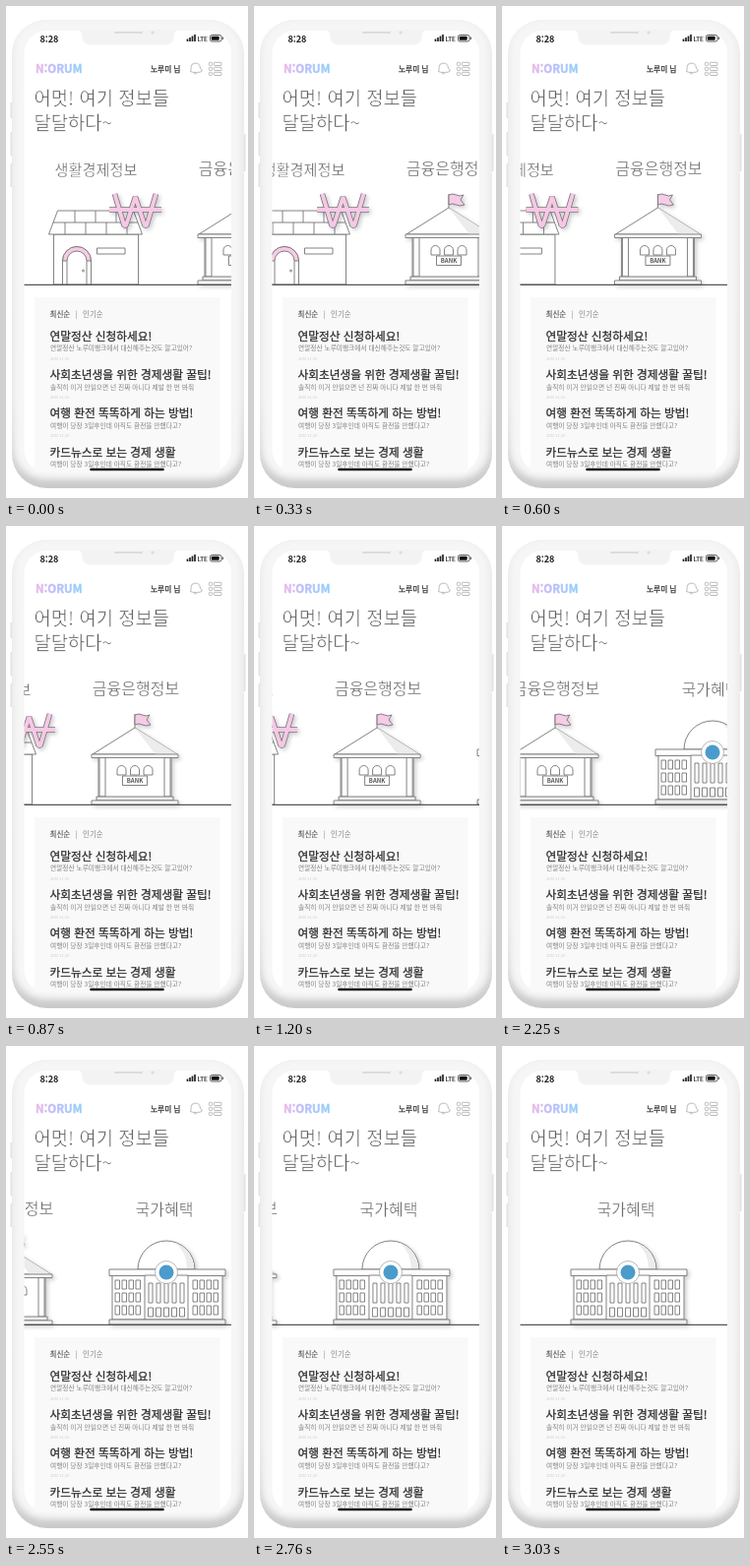
An HTML page that plays this animation: 246x500 px, repeating every 3990 ms.

```html
<!DOCTYPE html>
<html lang="ko">
<head>
<meta charset="utf-8">
<style>
html, body { margin: 0; width: 100%; height: 100%; overflow: hidden; background: #fff; }
svg { display: block; width: 246px; height: 500px; font-family: "Noto Sans CJK KR", "Noto Sans KR", sans-serif; }
.art { fill: #fff; stroke: #757575; stroke-width: .9; stroke-linejoin: round; }
.art .none { fill: none; }
.art .gray { fill: #ececec; }
.art .pink { fill: #f6cbe6; }
/* A white outline thins the letters, a dark one thickens them */
.title { font-size: 16px; fill: #6c6c6c; stroke: #fff; stroke-width: .3; text-anchor: middle; }
.head { font-size: 18.8px; fill: #555; stroke: #fff; stroke-width: .55; }
.item { font-size: 11.7px; fill: #2a2a2a; stroke: #2a2a2a; stroke-width: .25; }
.sub { font-size: 6.7px; fill: #808080; }
.date { font-size: 3.8px; fill: #ccc; }
</style>
</head>
<body>
<svg viewBox="0 0 246 500">
  <defs>
    <linearGradient id="brand">
      <stop offset="0" stop-color="#efb8ea"/>
      <stop offset=".4" stop-color="#bcbcfa"/>
      <stop offset="1" stop-color="#94d2fa"/>
    </linearGradient>
    <linearGradient id="shell" x2="0" y2="1">
      <stop offset="0" stop-color="#ebebeb"/>
      <stop offset=".8" stop-color="#e6e6e6"/>
      <stop offset="1" stop-color="#c6c6c6"/>
    </linearGradient>
    <filter id="soft"><feGaussianBlur stdDeviation="3"/></filter>
    <filter id="shade" x="-30%" y="-30%" width="170%" height="170%">
      <feDropShadow dx="2" dy="2" stdDeviation="2" flood-color="#000" flood-opacity=".2"/>
    </filter>
    <clipPath id="view"><rect x="18.500" y="150" width="210.500" height="140"/></clipPath>
    <clipPath id="body"><rect x="6" y="14" width="236" height="476" rx="35"/></clipPath>
  </defs>

  <!-- phone -->
  <path d="M5.500 98v16M5.500 128v24M5.500 160v24M242.500 130v38" stroke="#e2e2e2" stroke-width="2"/>
  <g clip-path="url(#body)">
    <rect width="246" height="500" fill="url(#shell)"/>
    <rect x="8" y="13" width="231" height="468" rx="32" fill="#f6f6f6" filter="url(#soft)"/>
  </g>
  <rect x="18.500" y="25" width="210.500" height="449" rx="23" fill="#fff"/>
  <path d="M72 24.500q5 0 5 5q0 10 10 10h74q10 0 10-10q0-5 5-5z" fill="#f3f3f3"/>
  <path d="M111 27h27" stroke="#dcdcdc" stroke-width="2" stroke-linecap="round"/>
  <circle cx="149" cy="27" r="1.800" fill="#dedede"/>

  <!-- status bar -->
  <text x="34.500" y="36.500" font-size="9" font-weight="700" fill="#222">8:28</text>
  <path d="M184.500 36v-2.500M187 36v-4M189.500 36v-5.500M192 36v-7" stroke="#222" stroke-width="1.700"/>
  <text x="194.500" y="36" font-size="6.500" fill="#222" stroke="#222" stroke-width=".2">LTE</text>
  <rect x="207.500" y="29.500" width="11.500" height="6.500" rx="1.800" fill="none" stroke="#333" stroke-width=".8"/>
  <rect x="208.700" y="30.700" width="8" height="4.100" rx=".8" fill="#111"/>
  <path d="M220.300 31.500v2.500" stroke="#333"/>

  <!-- header -->
  <text x="30" y="67.800" font-size="11.500" font-weight="700" fill="url(#brand)" stroke="url(#brand)" stroke-width=".4">N:ORUM</text>
  <text x="147" y="66.800" font-size="7.700" fill="#333" stroke="#333" stroke-width=".25">노루미 님</text>
  <path d="M187.500 66.500q1-1 .5-4q0-4 4-4.500q5 0 5.500 5l2 3q-1 1.500-6 1.500t-6-1zM191 68q1 2 3 0" fill="none" stroke="#aaa" stroke-width=".8"/>
  <g id="menu" fill="none" stroke="#aaa" stroke-width=".8"></g>
  <text class="head" x="28.500" y="101">어멋! 여기 정보들</text>
  <text class="head" x="28.500" y="126">달달하다~</text>

  <!-- carousel -->
  <g clip-path="url(#view)">
    <g id="track">
      <text class="title" x="91.500" y="171.500" style="font-size:15.200px">생활경제정보</text>
      <text class="title" x="240" y="171">금융은행정보</text>
      <text class="title" x="397" y="171.500">국가혜택</text>

      <g class="art">
        <path d="M48.500 232h86v51h-86z"/>
        <path d="M52.500 208h77l9 24H43.500z"/>
        <path class="none" d="M48 220h86M70 208v12M91 208v12M112 208v12M60 220v12M81 220v12M102 220v12M123 220v12"/>
        <path d="M57.500 283v-24a14.500 14.500 0 0 1 29 0v24z"/>
        <path class="pink" d="M57.500 259a14.500 14.500 0 0 1 29 0h-4.500a10 10 0 0 0-20 0z"/>
        <path class="none" d="M62 283v-24M82 283v-24"/>
        <circle cx="78.500" cy="269" r="1"/>
        <path d="M92.500 246h28.500v6h-28.500z"/>
        <g filter="url(#shade)" id="won" stroke-linejoin="bevel"></g>
      </g>

      <g class="art" transform="translate(239)" filter="url(#shade)">
        <path d="M0 206v-15"/>
        <path class="pink" d="M0 192q4-2 7.500 0t7.500 0l-3 5 4 5q-5 2-8.500 0t-7.500 0z"/>
        <path d="M-37 234h74v43h-74z"/>
        <path d="M0 205l43 27h-86z"/>
        <path class="gray" d="M0 205l43 27h-22z" stroke="none"/>
        <path d="M-44 232h88v3.500h-88z"/>
        <g id="bank"></g>
        <path d="M-12.500 254h25v9.500h-25z"/>
        <text y="261" font-size="6" font-weight="700" text-anchor="middle" style="fill:#555;stroke:none">BANK</text>
        <path class="gray" d="M-39 275h78v4h-78z"/>
        <path d="M-44 279h88v4h-88z"/>
      </g>

      <g class="art" transform="translate(400)" filter="url(#shade)">
        <path d="M-30 227a29 29 0 0 1 58 0z"/>
        <path class="gray" d="M8 200a29 29 0 0 1 19 26h-7q0-16-12-26z" stroke="none"/>
        <path d="M-56 233h112v45h-112z"/>
        <path d="M-59 227h118v6.500h-118z"/>
        <path d="M-23 233h44v45h-44z"/>
        <g id="hall"></g>
        <path class="gray" d="M-59 278h118v5h-118z"/>
        <circle cx="-1" cy="230" r="11.500" stroke-width=".5"/>
        <circle cx="-1" cy="230" r="7.500" stroke="none" style="fill:#4b9bcb"/>
      </g>
    </g>
  </g>
  <path d="M18.500 283.300H229" stroke="#555" stroke-width="1.200"/>

  <!-- list -->
  <rect x="29" y="296" width="188.500" height="178" fill="#f9f9f9"/>
  <g font-size="7.500" fill="#888">
    <text x="44.500" y="316" fill="#555" stroke="#555" stroke-width=".15">최신순</text>
    <text x="70.500" y="315.500">|</text>
    <text x="78" y="316">인기순</text>
  </g>
  <g id="list"></g>
  <path d="M86.500 471h73" stroke="#111" stroke-width="2.600" stroke-linecap="round"/>
</svg>
<script>
const $ = id => document.getElementById(id);
const rect = (x, y, w, h, extra = '') => `<rect x="${x}" y="${y}" width="${w}" height="${h}" ${extra}/>`;

$('menu').innerHTML = [57.3, 62.3, 67.3].map(y =>
  rect(206.3, y, 3.2, 3.2, 'rx="1"') + rect(211.3, y, 7.7, 3.2, 'rx="1"')).join('');

const won = 'M110.500 191l9.500 32h2l9.500-29 9.500 29h2l9.500-32M105 207h53';
$('won').innerHTML = [['#777', 5.6], ['#f6c8e6', 4]].map(([color, width]) =>
  `<path class="none" d="${won}" stroke="${color}" stroke-width="${width}"/>`).join('');

// Arched windows between the outer columns
$('bank').innerHTML = [-36, 30].map(x => rect(x, 235.5, 6, 39.5)).join('') +
  [-18, -4.5, 9].map(x => `<path d="M${x} 253v-5a4.500 4.500 0 0 1 9 0v5z"/>`).join('');

let hall = '';
for (const side of [-53, 26])
  for (let row = 0; row < 3; row++)
    for (let col = 0; col < 4; col++)
      hall += rect(side + col * 7, 238 + row * 13, 4.5, 9);
for (let i = 0; i < 5; i++) hall += rect(-19 + i * 8, 241, 4, 20);
for (let i = 0; i < 5; i++) hall += rect(-19.5 + i * 8, 266, 5, 9);
$('hall').innerHTML = hall;

const trip = '여행이 당장 3일후인데 아직도 환전을 안했다고?';
$('list').innerHTML = [
  ['연말정산 신청하세요!', '연말정산 노루미뱅크에서 대신해주는것도 알고있어?'],
  ['사회초년생을 위한 경제생활 꿀팁!', '솔직히 이거 안읽으면 넌 진짜 아니다 제발 한 번 봐줘'],
  ['여행 환전 똑똑하게 하는 방법!', trip],
  ['카드뉴스로 보는 경제 생활', trip]
].map(([title, sub], i) => {
  const y = 340 + i * 39.2;
  return `<text class="item" x="44.5" y="${y}">${title}</text>
    <text class="sub" x="45" y="${y + 10.3}">${sub}</text>` +
    (i < 3 ? `<text class="date" x="45" y="${y + 19.5}">2020.11.23</text>` : '');
}).join('');

// Scroll keys: time, offset, velocity
const keys = [
  [0, 0, .12], [330, 41, .13], [870, 108, .04], [1290, 114, 0],
  [1820, 114, 0], [1820, 114, .13], [2250, 185, .17], [2550, 236, .15], [3040, 271, 0]
];

function scroll(t) {
  const i = keys.findIndex(k => k[0] > t);
  if (i < 0) return 271;
  const [t0, x0, v0] = keys[i - 1], [t1, x1, v1] = keys[i];
  const d = t1 - t0, u = (t - t0) / d, w = 1 - u;
  return x0 * w * w * (1 + 2 * u) + x1 * u * u * (3 - 2 * u) + d * u * w * (v0 * w - v1 * u);
}

function draw() {
  const t = Math.floor(performance.now() % 3990 / 30) * 30;
  $('track').setAttribute('transform', `translate(${-scroll(t)})`);
  requestAnimationFrame(draw);
}
draw();
</script>
</body>
</html>
```
